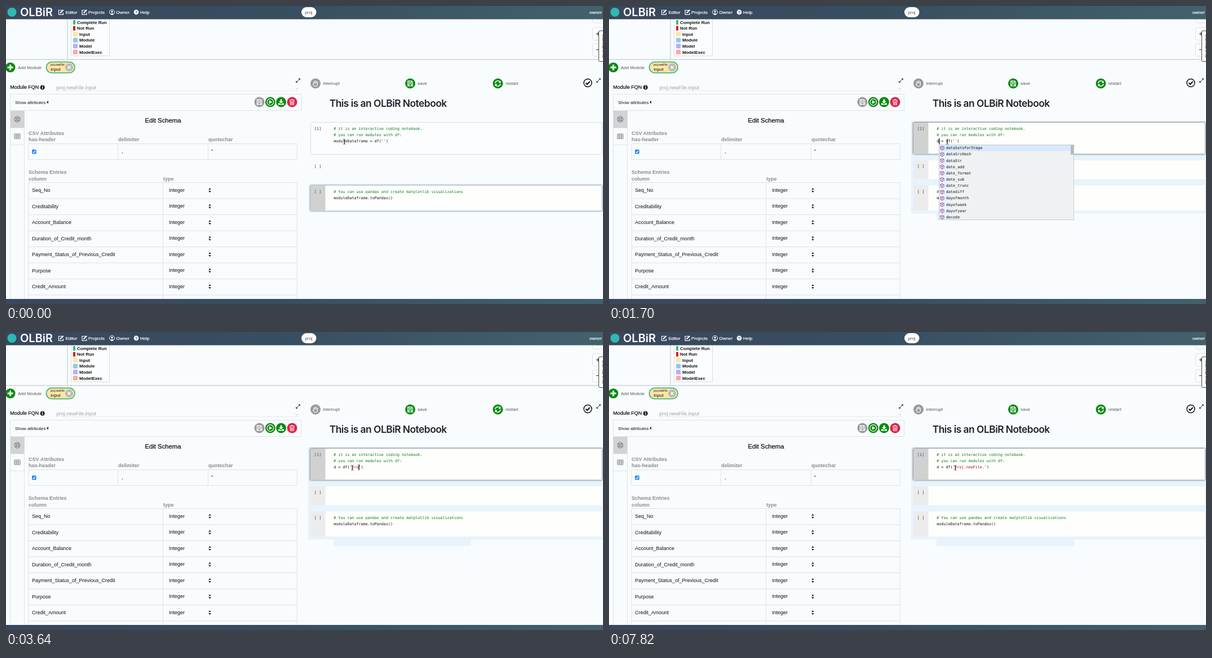
An HTML page for the animation above (8000 ms loop, 1059 by 529 pixels).

```html
<!DOCTYPE html>
<html lang="en">
<head>
<meta charset="utf-8">
<title>Notebook editor</title>
<style>
html, body { margin: 0; width: 100%; height: 100%; overflow: hidden; background: #f9fcff; }
svg { display: block; }
text { fill: currentColor; font-family: "Liberation Sans", Arial, sans-serif; white-space: pre; }
.bold { font-weight: bold; }
.medium { stroke: currentColor; stroke-width: .2; }
.title { font-family: Inter, sans-serif; font-weight: 600; }
.tight { letter-spacing: -.03em; }
.code { font-family: "DejaVu Sans Mono", monospace; }
</style>
</head>
<body>
<svg id="stage" width="1059" height="529" viewBox="0 0 1059 529"></svg>
<script>
const GREEN = '#078a0f', LINE = '#dfe3e6', WASH = '#e8f3fc', STRING = '#a31515';
const CODE_X = 581.3, CODE_SIZE = 6.7, CHAR = CODE_SIZE * .602;

const text = (x, y, s, size = 9, color = '#111', cls = '') =>
  `<text x="${x}" y="${y}" font-size="${size}" color="${color}" class="${cls}">${s}</text>`;
const code = (x, y, s, color = '#111') => text(x, y, s, CODE_SIZE, color, 'code');
const prompt = (y, s) => text(546.7, y, s, 7.1, '#777', 'code bold');
const rect = (x, y, w, h, fill, stroke = 'none', rx = 0, extra = '') =>
  `<rect x="${x}" y="${y}" width="${w}" height="${h}" fill="${fill}" stroke="${stroke}" rx="${rx}" ${extra}/>`;
const disc = (x, y, r, fill, stroke = 'none', width = 1) =>
  `<circle cx="${x}" cy="${y}" r="${r}" fill="${fill}" stroke="${stroke}" stroke-width="${width}"/>`;
const line = (d, color = LINE, width = 1) =>
  `<path d="${d}" fill="none" stroke="${color}" stroke-width="${width}"/>`;
const shape = (d, fill) => `<path d="${d}" fill="${fill}"/>`;
const at = (x, y, s) => `<g transform="translate(${x} ${y})">${s}</g>`;

// Icon glyphs, centred on the origin
const floppy = line('M-4.3 -4.3H2.6L4.3 -2.6V4.3H-4.3ZM-2 -4V-1.2H2V-4M-2.5 4V1H2.5V4', '#fff', 1.2);
const plus = line('M-5 0H5M0 -5V5', '#fff', 2.8);
const play = disc(0, 0, 5.8, 'none', '#fff', 1.2) + shape('M-1.9 -3.3L3.6 0L-1.9 3.3Z', '#fff');
const download = shape('M-1.3 -5H1.3V-1.5H4L0 2.5L-4 -1.5H-1.3ZM-5 2H-2.5L0 4L2.5 2H5V5H-5Z', '#fff');
const trash = line('M-4.5 -3.5H4.5M-1.5 -4.7H1.5M-3.3 -2.5L-2.8 4.7H2.8L3.3 -2.5M-1 -1.5V3.5M1 -1.5V3.5', '#fff', 1.1);
const hand = line('M-2 5L-4.5 1L-3 .5V-3.5M-1 0V-5M1 0V-5M3 0V-3.5M3.5 -2V2L2 5H-2', '#fff', 1.1);
const refresh = line('M-4.7 -.7A4.8 4.8 0 0 1 3.7 -3M4.7 .7A4.8 4.8 0 0 1 -3.7 3', '#fff', 1.5)
  + shape('M5 -5V-1H1ZM-5 5V1H-1Z', '#fff');
const expand = line('M-3 3L3 -3', '#222', 1) + shape('M.5 -3.7H3.7V-.5ZM-.5 3.7H-3.7V.5Z', '#222');
const button = (x, y, fill, glyph, r = 9) => at(x, y, disc(0, 0, r, fill) + glyph);

function header() {
  const pen = line('M2 -3.5H-4V4.2H4V1', '#fff', 1.2) + line('M-1.5 1.5L4.3 -4', '#fff', 2);
  const user = disc(0, 0, 4.5, 'none', '#fff') + disc(0, -1, 1.7, '#fff') + shape('M-3 3.3Q0 .3 3 3.3Q0 5 -3 3.3Z', '#fff');
  const menu = [[105.5, 'Editor'], [146, 'Projects'], [195.5, 'Owner'], [238, 'Help']];
  return rect(0, 0, 1059, 23.5, 'url(#bar)') + rect(0, 520, 1059, 9, 'url(#bar)')
    + disc(10.5, 11, 8, '#2fb9b0')
    + text(25, 18, 'OLBiR', 20, '#fff', 'title')
    + at(97.5, 11, pen) + at(139, 11, pen) + at(188, 11, user)
    + disc(231, 11, 4.4, '#fff') + text(229, 13.6, '?', 7, '#3b4a60', 'bold')
    + menu.map(([x, s]) => text(x, 14, s, 8, '#fff', 'medium')).join('')
    + rect(524, 2, 26.5, 18, '#fff', 'none', 9) + text(530.3, 13.7, 'proj', 8, '#555')
    + text(1035, 14, 'owner', 8, '#fff', 'medium');
}

function graph() {
  const keys = [['Complete Run', '#3dbb78'], ['Not Run', '#e01a1a'], ['Input', '#fde5a5'],
    ['Module', '#8fc8f4'], ['Model', '#b5aff7'], ['ModelExec', '#f9aaa4']];
  const legend = keys.map(([s, c], i) => {
    const y = 29 + i * 10.55, wide = i > 1;
    return rect(119, y - 4, wide ? 8 : 4, 8, c) + text(wide ? 130 : 126, y + 2.8, s, 7.8, '#111', 'bold');
  }).join('');
  const zoom = [8, 38.5, 67].map(y => rect(1040.5, y, 24, 22, '#fbfdff', '#dde0e3', 3)).join('');
  return line('M109 23V95', '#d5d8da', 1.6) + rect(115.5, 15, 68, 73.5, '#fcfdff', '#dcdfe2')
    + legend + line('M0 95H1059', '#d0d3d5', 1.4)
    + zoom + line('M1047 20Q1051 26 1055 20', '#444')
    + line('M1047 49.5H1053M1050 46.5V52.5M1047 77.5H1053', '#333', 1.2)
    + rect(1051.5, 44, 14, 54.5, '#fff', '#444', 2)
    + `<g transform="translate(1062.5 92) rotate(-90)">${text(0, 0, 'RUNTIMES', 8)}</g>`;
}

function modulePanel() {
  const columns = ['Seq_No', 'Creditability', 'Account_Balance', 'Duration_of_Credit_month',
    'Payment_Status_of_Previous_Credit', 'Purpose', 'Credit_Amount'];
  const label = (x, y, s) => text(x, y, s, 9, '#8a8d90', 'bold');
  const rows = columns.map((s, i) => {
    const y = 327 + i * 28.5;
    return text(46, y + 3.1, s) + text(289, y + 2.8, 'Integer')
      + at(361.5, y, shape('M-2.3 -.9L0 -4.1L2.3 -.9ZM-2.3 1.1L0 4.3L2.3 1.1Z', '#222'))
      + line(`M40 ${y + 15}H516.5`);
  }).join('');
  const ring = disc(0, 0, 5, 'none', '#777') + disc(0, 0, 2, 'none', '#777')
    + line('M-3.5 -3.5L-1.4 -1.4M3.5 -3.5L1.4 -1.4M-3.5 3.5L-1.4 1.4M3.5 3.5L1.4 1.4', '#777', 1.5);
  const grid = line('M-5 -4H5V4.5H-5ZM-5 -1.2H5M-5 1.7H5M-1.7 -4V4.5M1.7 -4V4.5', '#888', 1);
  return button(7.7, 109, GREEN, plus, 8.8) + text(21, 112, 'Add Module', 7.9, '#555')
    + rect(71.5, 99.3, 50.5, 19.4, '#fce5a6', '#42b874', 9.7, 'stroke-width="1.8"')
    + text(79, 106, 'proj.newFile', 4.6) + text(79.3, 115, 'input', 8)
    + disc(112, 109, 7, '#b8bab8') + line('M109.3 106.3L114.7 111.7M114.7 106.3L109.3 111.7', '#fff', 1.5)
    + at(518, 132.3, expand)
    + text(7.3, 147.4, 'Module FQN', 9, '#111', 'medium')
    + disc(64.7, 144.4, 4, '#222') + line('M64.7 143.5V147M64.7 141.6V142.7', '#fff', 1.3)
    + text(89.5, 147.5, 'proj.newFile.input', 9, '#a0a3a6')
    + line('M89 150.5H519', '#e6eaed') + line('M513.5 145.5L516 147.5L518.5 145.5', '#bbb', .8)
    + line('M7.5 522V156.5H523.5V185.5H8M32.5 186V520M8 246.5H32')
    + text(16, 173.8, 'Show attributes', 7.9) + shape('M75 168V173.4L72 170.7Z', '#222')
    + button(449.5, 170.5, '#999', floppy) + button(468.8, 170.5, GREEN, play)
    + button(488, 170.5, GREEN, download) + button(507.5, 170.5, '#dc2348', trash)
    + rect(8, 186, 24.5, 30.5, '#d1d3d4') + at(20, 201, ring) + at(20, 231, grid)
    + text(246.5, 206.7, 'Edit Schema', 11.3, '#000', 'medium')
    + label(40, 228.6, 'CSV Attributes') + label(40, 240.3, 'has-header')
    + label(199, 240.3, 'delimiter') + label(359, 240.3, 'quotechar')
    + line('M40 244.5H516.5V272.5H40ZM198.5 244.5V272.5M358.5 244.5V272.5')
    + rect(46, 254.8, 7.7, 7.7, '#2b87f3', 'none', 1.5) + line('M47.8 258.8L49.3 260.5L52 256.7', '#fff', 1.2)
    + text(205, 261, ',') + text(364, 261, '"')
    + label(40, 297.7, 'Schema Entries') + label(40, 309.6, 'column') + label(279, 309.6, 'type')
    + line('M40 520V313.5H516.5V520M278.5 313.5V520') + rows;
}

const gutter = (y, h, fill) => rect(540, y, 26.5, h, fill);
const cell = (y, h, fill) => rect(540, y, 517, h, '#fefefc') + gutter(y, h, fill);
const activeCell = (y, h, glow) =>
  rect(539.5, y - .5, 518, h + 1, glow, 'none', 1, 'filter="url(#glow)"')
  + rect(540, y, 517, h, '#fefefc') + gutter(y, h, '#d0d1d1');

function notebook() {
  return button(549, 137.5, '#999', hand) + text(562.5, 140, 'interrupt', 8, '#555')
    + button(717, 137.5, GREEN, floppy) + text(730, 140, 'save', 8, '#555')
    + button(872.5, 137.5, GREEN, refresh) + text(886, 140, 'restart', 8, '#555')
    + disc(1032, 136.5, 7, 'none', '#111', 1.5) + line('M1028.5 136.5L1031 139L1035.7 134', '#111', 2)
    + at(1051, 132.3, expand)
    + text(573.7, 179.3, 'This is an OLBiR Notebook', 17.4, '#20242a', 'title tight')
    + `<g id="idle">${rect(540.5, 206.5, 517, 57, '#fbfdfe', '#d9dde0', 2)}${activeCell(318.5, 45, '#54768f')}</g>`
    + `<g id="editing">${rect(535.5, 205, 524, 163.5, WASH)}${activeCell(207, 55.5, '#555c62')}`
    + `${cell(274, 33.5, '#ececed')}${cell(318.5, 44.5, '#ececed')}</g>`
    + `<g id="residue">${rect(581, 368, 244, 12, WASH)}</g>`
    + prompt(220, '[1]') + prompt(287.2, '[ ]') + prompt(332, '[ ]')
    + code(CODE_X, 220, '# it is an interactive coding notebook.', '#08780f')
    + code(CODE_X, 231.2, '# you can run modules with df:', '#08780f')
    + code(CODE_X, 331.8, '# You can use pandas and create matplotlib visualizations', '#08780f')
    + code(CODE_X, 343, 'moduleDataframe.toPandas()')
    + `<g id="edited"></g>`;
}

function popup() {
  const items = ['dataSetsForStage', 'dataSrcHash', 'dataStr', 'date_add', 'date_format', 'date_sub',
    'date_trunc', 'datediff', 'dayofmonth', 'dayofweek', 'dayofyear', 'decode'];
  const cube = line('M0 -3.5L3.2 -2V2L0 3.6L-3.2 2V-2ZM-3.2 -2L0 -.4L3.2 -2M0 -.4V3.6', '#75449a', .8);
  return rect(585.5, 246.5, 239, 133, '#f0f1f3', '#c9cbce') + rect(586, 247, 233, 10.8, '#d8e9fb')
    + items.map((s, i) => {
      const y = 254.2 + i * 11.16;
      return at(591, y - 2.2, cube) + code(598, y, `<tspan fill="#0066bf" class="bold">d</tspan>${s.slice(1)}`);
    }).join('')
    + rect(819, 247, 5.5, 17, '#b8babd');
}

const stage = document.getElementById('stage');
stage.innerHTML = `<defs>
  <linearGradient id="bar"><stop offset="0" stop-color="#3a475e"/><stop offset=".45" stop-color="#374e61"/>
  <stop offset="1" stop-color="#42616d"/></linearGradient>
  <filter id="glow" x="-5%" y="-20%" width="110%" height="140%"><feGaussianBlur stdDeviation="1.5"/></filter></defs>`
  + rect(0, 0, 1059, 529, '#f9fcff') + graph() + modulePanel() + notebook() + header()
  + `<g id="popup">${popup()}</g>`
  + `<g id="caret">${rect(-.2, 235, 1.3, 10.3, '#000')}</g>`
  + `<g id="mouse">${line('M-1.8 -4.3Q0 -4.3 0 -3V3Q0 4.3 -1.8 4.3M1.8 -4.3Q0 -4.3 0 -3V3Q0 4.3 1.8 4.3', '#222', .9)}</g>`;

const part = id => document.getElementById(id);
const show = (id, on) => part(id).setAttribute('display', on ? 'inline' : 'none');
const move = (id, x, y) => part(id).setAttribute('transform', `translate(${x} ${y})`);

const TYPED = 'proj.newFile.';
const KEYS = [3340, 3490, 3640, 3790, 4090, 5130, 5280, 5430, 5580, 5880, 5880, 6030, 6320];
const BLINKS = [660, 1110, 1550, 2150, 2600, 3050, 3340, 4540, 4990, 6770, 7220, 7820];
const passed = (times, t) => times.filter(at => at <= t).length;
let shownLine;

function draw(t) {
  const name = t < 1550 ? 'moduleDataframe' : t < 1700 ? '' : 'd';
  const count = passed(KEYS, t);
  const column = t < 2600 ? name.length : 8 + count;
  const source = `${name} = df(<tspan fill="${STRING}">'${TYPED.slice(0, count)}'</tspan>)`;
  if (source !== shownLine) part('edited').innerHTML = code(CODE_X, 242.3, shownLine = source);

  show('idle', t < 450);
  show('editing', t >= 450);
  show('residue', t >= 1700);
  show('popup', t >= 1700 && t < 2600);
  show('caret', passed(BLINKS, t) % 2);
  move('caret', CODE_X + column * CHAR, 0);

  // The pointer glides in 150 ms steps to the quotes
  const p = passed([2000, 2150, 2300, 2450], t) / 4;
  move('mouse', 600.3 + 14 * p * p * (3 - 2 * p), 241);
}

const start = performance.now();
(function tick() {
  draw((performance.now() - start) % 8000);
  requestAnimationFrame(tick);
})();
</script>
</body>
</html>
```
